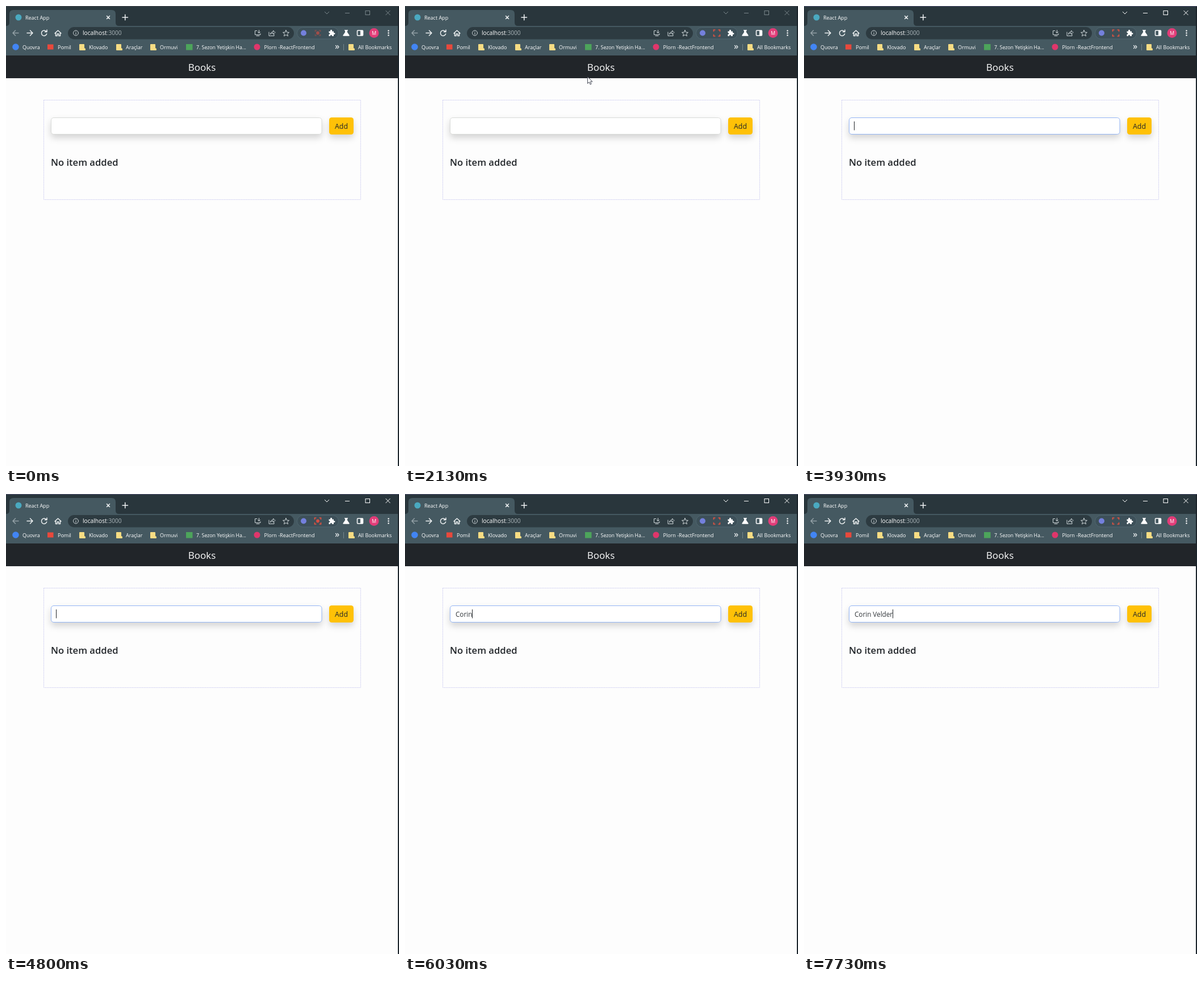
These frames come from a looping animation (692x809 px, 8000 ms). An HTML page:

```html
<!DOCTYPE html>
<html lang="en">
<head>
<meta charset="utf-8">
<title>Books</title>
<style>
  html, body { margin: 0; width: 100%; height: 100%; overflow: hidden; background: #fdfdfd; }
  svg { display: block; width: 692px; height: 809px; }
  text { font: 9px "Open Sans", "Noto Sans", sans-serif; fill: #fff; white-space: pre; }
  .line { fill: none; stroke: #eef1f2; stroke-width: 1.5; stroke-linecap: round; stroke-linejoin: round; }
  .thin { stroke-width: 1; stroke: #cdd5d8; }
  .field { fill: #fff; stroke: #d9dbd8; animation: focus 8s infinite; }
  .lift { filter: drop-shadow(0 6px 6px rgba(0, 0, 0, .16)); }
  .controls { fill: none; stroke: #7b878c; animation: activate 8s step-end infinite; }
  .edge { fill: #45494f; animation: edge 8s step-end infinite; }
  .pointer { animation: move 8s infinite, pointer 8s step-end infinite; }
  .beam { opacity: 0; animation: beam 8s step-end infinite; }
  .brackets { animation: brackets 8s step-end infinite; }
  .dot { animation: dot 8s step-end infinite; }

  @keyframes activate { 0% { stroke: #7b878c } 34.625%, 100% { stroke: #fff } }
  @keyframes edge { 0% { fill: #45494f } 34.625%, 100% { fill: #50526f } }
  @keyframes focus { 0%, 46.25% { stroke: #d9dbd8 } 48.4%, 100% { stroke: #94b5f5 } }
  @keyframes move {
    0%, 23.375% { transform: translate(628px, 266px); animation-timing-function: ease-out }
    26.625%, 39.625% { transform: translate(321px, 124px); animation-timing-function: linear }
    41.625% { transform: translate(279px, 180px) }
    42.5%, 100% { transform: translate(235px, 194px) }
  }
  @keyframes pointer { 0% { opacity: 0 } 23.375% { opacity: 1 } 42.5%, 100% { opacity: 0 } }
  @keyframes beam {
    0% { opacity: 0; transform: translate(225px, 205px) }
    42.5% { opacity: 1; transform: translate(225px, 205px) }
    43.375% { opacity: 1; transform: translate(204px, 205px) }
    46.25%, 100% { opacity: 0; transform: translate(204px, 205px) }
  }
  /* the capture badge cycles: dim, brackets, brackets with dot */
  @keyframes brackets {
    0%, 17.875%, 57.875%, 70%, 89.125% { opacity: .45; transform: scale(.82) }
    5.375%, 24.125%, 60%, 72.125%, 94%, 100% { opacity: 1; transform: none }
  }
  @keyframes dot {
    0%, 17.875%, 57.875%, 70%, 89.125% { opacity: .65 }
    5.375%, 24.125%, 46.25%, 72.125%, 94%, 100% { opacity: 0 }
    11.625%, 30.375%, 60%, 82.875% { opacity: 1 }
  }
</style>
</head>
<body>
<svg viewBox="0 0 692 809">
  <defs>
    <path id="folder" d="M0 1q0-1 1-1h7q1 0 1 1v6q2 0 2 2v1q0 1-1 1H1q-1 0-1-1z" fill="#f8dc83"/>
  </defs>

  <rect width="692" height="809" fill="#fdfdfd"/>

  <!-- title bar -->
  <rect width="690" height="36" fill="#29363c"/>
  <rect class="edge" width="692" height="1"/>
  <path d="M0 35q6 0 6-6V14q0-7 7-7h173q7 0 7 7v15q0 6 6 6z" fill="#455961"/>
  <circle cx="22" cy="20" r="5.5" fill="#4aa9c0"/>
  <text x="34" y="23.5">React App</text>
  <path class="line" stroke-width="1" d="M177.5 17.5l5 5m0-5l-5 5M205 20h9.500m-4.750-4.750v9.500"/>
  <g class="controls">
    <path d="M561 10l4 4 4-4M597 12.500h8M668.500 8l8 8m0-8l-8 8"/>
    <rect x="633" y="8.500" width="7.500" height="7"/>
  </g>

  <!-- toolbar -->
  <rect y="35" width="690" height="52" fill="#455961"/>
  <rect x="109" y="37" width="398" height="21.500" rx="10.750" fill="#2d3b41"/>
  <rect x="512.500" y="37.500" width="73" height="20.500" rx="10.250" fill="#3d5059" stroke="#506770"/>
  <path class="line" style="stroke:#94a1a7" d="M22 47.500H12m4.500-4.500L12 47.500l4.500 4.500"/>
  <path class="line" d="M37 47.500h10m-4.500-4.500l4.500 4.500-4.500 4.500"/>
  <path class="line" d="M71 45a4.700 4.700 0 1 0 .7 4M72 42v3.500h-3.500"/>
  <path class="line" d="M86 48l5.500-5 5.500 5M87.500 47v5.500h2.700V49h2.600v3.500h2.700V47"/>
  <g class="line thin">
    <circle cx="123" cy="47.500" r="4.500"/>
    <path d="M123 47v3M123 45v.1"/>
    <path d="M442 43.500h-3.500v7h9.500v-2M441 52.500h5M445.500 42.500v5m-2.200-2l2.200 2.200 2.200-2.200"/>
    <path d="M463 46v6.500h9V50M465.500 49.500q.5-4 5-4V43l3.500 3.500-3.500 3.500v-2.500q-3 0-5 2z"/>
    <path d="M493 42.500l1.500 3.600 4 .3-3 2.600 1 3.900-3.500-2.100-3.500 2.100 1-3.900-3-2.600 4-.3z"/>
  </g>
  <text x="135" y="51.300" style="font-size:10.200px">localhost<tspan fill="#aab4b8">:3000</tspan></text>

  <circle cx="524" cy="47.500" r="5" fill="#7480dd"/>
  <g transform="translate(549 47.500)">
    <path class="brackets" d="M-5.500-2.500v-3h3m5 0h3v3m0 5v3h-3m-5 0h-3v-3" fill="none" stroke="#f0523f" stroke-width="1.600"/>
    <circle class="dot" r="2.900" fill="#d94d42"/>
  </g>
  <path d="M568.500 44.500h2.700q-.7-2.700 1.400-2.700t1.400 2.700h3v2.800q2.500-.6 2.500 1.300t-2.500 1.300v3h-3q0-2.200-1.500-2.200t-1.500 2.200h-2.500v-2.800q2-.2 2-1.500t-2-1.500z" fill="#fff"/>
  <path d="M596 42h6v1.200h-1v3l3.500 5q.8 1.600-1 1.600h-9q-1.800 0-1-1.600l3.500-5v-3h-1z" fill="#fff"/>
  <rect x="618.500" y="43" width="10" height="9" rx="1" fill="none" stroke="#fff" stroke-width="1.500"/>
  <path d="M624 43h4.500v9H624z" fill="#fff"/>
  <circle cx="648" cy="47.500" r="8.500" fill="#e23c78"/>
  <text x="648" y="51" text-anchor="middle">M</text>
  <g fill="#fff">
    <circle cx="673.500" cy="43.500" r="1.200"/><circle cx="673.500" cy="47.500" r="1.200"/><circle cx="673.500" cy="51.500" r="1.200"/>
  </g>

  <!-- bookmarks -->
  <circle cx="17" cy="72" r="5.800" fill="#4285f4"/>
  <text x="29" y="75.500">Quovra</text>
  <rect x="73" y="67.500" width="10.500" height="9" fill="#e8493c"/>
  <text x="91" y="75.500">Pomil</text>
  <use href="#folder" x="129" y="67"/>
  <text x="146" y="75.500">Klovado</text>
  <use href="#folder" x="194" y="67"/>
  <text x="211" y="75.500">Araçlar</text>
  <use href="#folder" x="254" y="67"/>
  <text x="271" y="75.500">Ormuvi</text>
  <rect x="317" y="67" width="11.500" height="10.500" fill="#4da45b"/>
  <text x="335" y="75.500" style="font-size:8.750px">7. Sezon Yetişkin Ha...</text>
  <circle cx="442" cy="72" r="5.500" fill="#e0366b"/>
  <text x="454.500" y="75.500">Plorn -ReactFrontend</text>
  <path class="line" style="stroke-width:1.200" d="M580.500 69.500l2.300 2.500-2.300 2.500m3.200-5l2.300 2.500-2.300 2.500"/>
  <path d="M594.500 67v11" stroke="#75868d"/>
  <use href="#folder" x="603" y="67"/>
  <text x="620" y="75.500" style="font-size:8.900px">All Bookmarks</text>

  <!-- page -->
  <rect y="87" width="690" height="40" fill="#212529"/>
  <text x="345" y="114" text-anchor="middle" style="font-size:17px">Books</text>
  <rect x="66.500" y="165.500" width="558" height="175" fill="none" stroke="#cfcff0" stroke-dasharray="2 1"/>
  <g class="lift">
    <rect class="field" x="79.500" y="196.500" width="476.500" height="29" rx="4.500"/>
  </g>
  <g class="lift">
    <rect x="569" y="196" width="43" height="30" rx="4.500" fill="#ffc107"/>
  </g>
  <text x="590.500" y="216" text-anchor="middle" style="font-size:12.400px;fill:#212529">Add</text>
  <text x="79" y="281" style="font-size:16.600px;font-weight:600;fill:#212529">No item added</text>
  <text id="typed" x="89" y="215.500" style="font-size:11.700px;fill:#33383c"></text>
  <path id="caret" d="M.5 203v15.500" stroke="#212529"/>
  <rect x="690" y="1" width="2" height="808" fill="#1b242b"/>

  <path class="pointer" d="M.5.500v11.800l2.700-2.500 2 4.200 1.900-.9-1.900-4H9z" fill="#fff" stroke="#333744" stroke-width=".9"/>
  <path class="beam" d="M-2.500-6.500h2l.5.500.5-.5h2M0-6V6M-2.500 6.500h2L0 6l.5.500h2" fill="none" stroke="#333"/>
</svg>

<script>
  const LOOP = 8000;
  const TITLE = "Corin Velder";
  const keyTimes = [5370, 5600, 5630, 5770, 6030, 6230, 6270, 6630, 6700, 7130, 7330, 7500];
  const typed = document.getElementById("typed");
  const caret = document.getElementById("caret");
  const start = performance.now();

  const within = (t, from, to) => t >= from && t < to;
  const caretVisible = t => within(t, 3730, 4250) || within(t, 4800, 5230) || t >= keyTimes[0];

  function draw() {
    const t = Math.max(0, performance.now() - start) % LOOP;
    const count = keyTimes.filter(time => time <= t).length;
    const text = TITLE.slice(0, count);
    if (typed.textContent !== text) typed.textContent = text;
    const x = 88 + (count ? Math.round(typed.getComputedTextLength()) + 1 : 0);
    caret.setAttribute("transform", `translate(${x} 0)`);
    caret.setAttribute("opacity", caretVisible(t) ? 1 : 0);
    requestAnimationFrame(draw);
  }
  draw();
</script>
</body>
</html>
```
